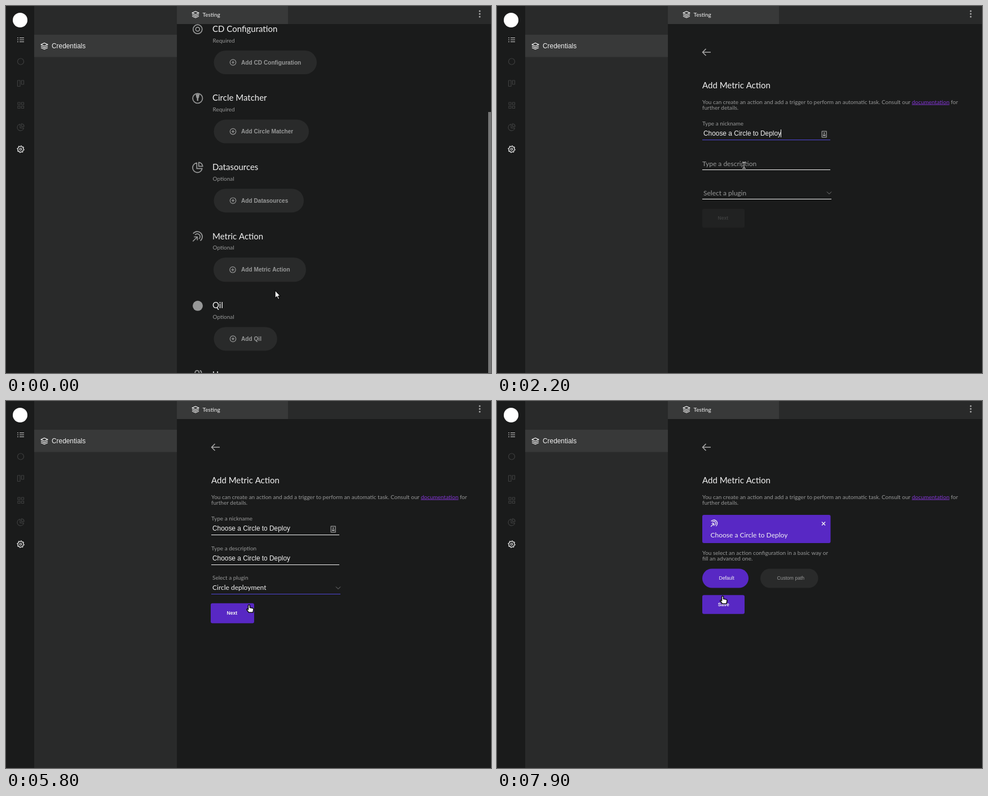
Recreate the animation shown at these times as an HTML page with a canvas. Size 860 px wide and 651 px high, loop 8 s.

```html
<!DOCTYPE html>
<html lang="en">
<head>
<meta charset="utf-8">
<style>
  html, body { margin: 0; width: 100%; height: 100%; overflow: hidden; background: #1a1b1b; }
  canvas { display: block; width: 860px; height: 651px; }
</style>
</head>
<body>
<canvas id="stage" width="860" height="651"></canvas>
<script>
const ctx = document.getElementById('stage').getContext('2d');
const LOOP = 8000, STEP = 100;
const BG = '#1a1b1b', PANEL = '#292a2a', RAISED = '#383939';
const WHITE = '#f2f2f2', GREY = '#979898', DIM = '#3d3e3e';
const PURPLE = '#5828c4', FOCUS = '#4f46d6', LINK = '#8034d0';
const LATO = 'Lato, sans-serif', SANS = '"Liberation Sans", Arial, sans-serif';
const SMALL = 10, BODY = 12, TITLE = 15, INPUT = 11.88, LABEL = 10.15, TINY = 8.57;
const PHRASE = 'Choose a Circle to Deploy';

const clamp = v => Math.max(0, Math.min(1, v));
const mix = (a, b, k) => a + (b - a) * k;

function text(str, x, y, size, color, family = LATO, weight = 400) {
  ctx.font = `${weight} ${size}px ${family}`;
  ctx.fillStyle = color;
  ctx.fillText(str, x, y);
  return x + ctx.measureText(str).width;
}

function box(x, y, w, h, color, r = 0) {
  ctx.fillStyle = color;
  ctx.beginPath();
  ctx.roundRect(x, y, w, h, r);
  ctx.fill();
}

function shape(d, x, y, { stroke, fill, width = 1.4, scale = 1 }) {
  const path = new Path2D(d);
  ctx.save();
  ctx.translate(x, y);
  ctx.scale(scale, scale);
  ctx.lineWidth = width / scale;
  ctx.lineJoin = 'round';
  if (fill) { ctx.fillStyle = fill; ctx.fill(path); }
  if (stroke) { ctx.strokeStyle = stroke; ctx.stroke(path); }
  ctx.restore();
}

const ring = r => `M${r} 0A${r} ${r} 0 1 1 ${-r} 0A${r} ${r} 0 1 1 ${r} 0Z`;
const gear = 'M' + Array.from({ length: 32 }, (_, i) => {
  const a = (i + .5) * Math.PI / 16, r = i % 4 < 2 ? 6 : 4.6;
  return `${r * Math.cos(a)} ${r * Math.sin(a)}`;
}).join('L') + 'Z';

const ICON = {
  layers: 'M0-5.5L6-2.6L0 .3L-6-2.6ZM-6 .3L0 3.1L6 .3M-6 3L0 5.8L6 3',
  target: ring(8) + ring(3.5),
  matcher: ring(8.7) + 'M0 4V-1',
  keyhole: 'M-3.5-7.5H3.5L2.5-2.5Q2 0 1.2 0V4.5H-1.2V0Q-2 0-2.5-2.5Z',
  pie: 'M-1.5-8A8.5 8.5 0 1 0 8 2H-1.5ZM2-9A7.5 7.5 0 0 1 9-2H2Z',
  metric: 'M-7.9-5.2A9 9 0 1 1 4.7 7.4M-4.6-2.9A5 5 0 1 1 2.4 4.1M-8.5 8.5L-.5 .5M-6.5 .5H-.5V6.5',
  users: 'M-7 8V4Q-7 1-3 1H1Q5 1 5 4V8M2.5-4A3.5 3.5 0 1 1-4.5-4A3.5 3.5 0 1 1 2.5-4M4-7.5A3.6 3.6 0 0 1 4-.5',
  add: ring(5.2) + 'M-2.6 0H2.6M0-2.6V2.6',
  list: 'M-6-3.5H-4M-6 0H-4M-6 3.5H-4M-2-3.5H6M-2 0H6M-2 3.5H6',
  board: 'M-5.5-5H-1V5.5H-5.5ZM1.5-5H5.5V2H1.5Z',
  grid: 'M-5-5H-1V-1H-5ZM1.5-5H5.5V-1H1.5ZM-5 1.5H-1V5.5H-5ZM1.5 1.5H5.5V5.5H1.5Z',
  back: 'M15 0H.8M6.5-6L.5 0L6.5 6',
  chevron: 'M-4-2L0 2L4-2',
  close: 'M-3-3L3 3M3-3L-3 3'
};

const CURSOR = {
  arrow: 'M0 0V14.5L3.3 11.5L5.5 16.6L8 15.5L5.8 10.6H10Z',
  beam: 'M-3-5.5H-1L0-5L1-5.5H3M0-5V5M-3 5.5H-1L0 5L1 5.5H3',
  hand: 'M-1.5 1Q0-1 1.5 1V5L6.5 6Q8 6.5 8 8L7 13.5H-.5L-4 9Q-4.5 7-2.5 7.5L-1.5 8.5Z'
};

// time, x, y, kind
const POINTER = [
  [0, 477, 504, 'arrow'], [200, 477, 504, 'arrow'], [400, 461, 472, 'hand'], [500, 457, 463, 'hand'],
  [700, 457, 463, 'arrow'], [1000, 457, 463, 'arrow'], [1100, 454, 300, 'arrow'], [1300, 450, 227, 'beam'],
  [1800, 450, 227, 'beam'], [2000, 450, 279, 'beam'], [2200, 438, 282, 'beam'], [4000, 438, 282, 'beam'],
  [4100, 440, 303, 'arrow'], [4200, 440, 303, 'arrow'], [4300, 434, 326, 'arrow'], [4600, 434, 326, 'arrow'],
  [4700, 434, 368, 'arrow'], [4800, 434, 368, 'arrow'], [5000, 432, 355, 'arrow'], [5200, 431.5, 354, 'arrow'],
  [5300, 431.5, 354, 'arrow'], [5400, 431, 361.5, 'hand'], [6600, 431, 361.5, 'hand'], [6700, 441, 290, 'arrow'],
  [6800, 448, 205, 'arrow'], [6900, 455, 187, 'arrow'], [7000, 455, 187, 'arrow'], [7100, 473, 203, 'arrow'],
  [7200, 473, 203, 'arrow'], [7600, 402, 340, 'arrow'], [7700, 400, 346, 'hand'], [8000, 400, 346, 'hand']
];

function drawPointer(t) {
  const i = POINTER.findLastIndex(p => p[0] <= t);
  const a = POINTER[i], b = POINTER[i + 1] || a;
  const k = a === b ? 0 : (t - a[0]) / (b[0] - a[0]);
  const x = mix(a[1], b[1], k), y = mix(a[2], b[2], k), kind = a[3];
  if (kind === 'beam') {
    shape(CURSOR.beam, x, y + .5, { stroke: '#111', width: 2.2 });
    shape(CURSOR.beam, x, y + .5, { stroke: '#fff', width: 1 });
  } else {
    shape(CURSOR[kind], x, y, { stroke: '#111', fill: '#fff', width: 1.6 });
  }
}

function drawFrame() {
  box(50, 0, 253, 651, PANEL);
  box(50, 51, 253, 39.5, RAISED);
  box(303, 0, 557, 32, PANEL);
  box(303, 0, 197, 32, RAISED);
  shape(ring(13), 25, 25, { fill: '#fff' });
  shape(ICON.list, 26, 60, { stroke: '#d0d0d0', width: 1.1 });
  shape(ring(5.5), 26, 98.5, { stroke: DIM, width: 1.2 });
  shape(ICON.board, 26, 137, { stroke: DIM, width: 1.2 });
  shape(ICON.grid, 26, 176, { stroke: DIM, width: 1.2 });
  shape(ICON.pie, 26, 215, { stroke: DIM, width: 1.2, scale: .68 });
  shape(gear, 26, 254, { stroke: WHITE, width: 1.2 });
  shape(ring(1.8), 26, 254, { stroke: WHITE, width: 1.1 });
  shape(ICON.layers, 68, 71, { stroke: WHITE, width: 1.2 });
  text('Credentials', 81, 75, INPUT, WHITE, SANS);
  shape(ICON.layers, 336, 15, { stroke: WHITE, width: 1.2 });
  text('Testing', 348.5, 18.7, SMALL, WHITE);
  for (const y of [9, 14, 19]) shape(ring(1.5), 840, y, { fill: '#a8a8a8' });
}

const SECTIONS = [
  ['CD Configuration', 'Required', 'target'], ['Circle Matcher', 'Required', 'matcher'],
  ['Datasources', 'Optional', 'pie'], ['Metric Action', 'Optional', 'metric'],
  ['Qil', 'Optional', ''], ['Users', 'Optional', 'users']
];

function drawSections(t) {
  SECTIONS.forEach(([name, note, icon], i) => {
    const y = 40.5 + i * 122.6;
    if (icon) shape(ICON[icon], 339.8, y + .7, { stroke: GREY, width: 1.7 });
    else shape(ring(9), 340, y + .9, { fill: GREY });
    if (icon === 'matcher') shape(ICON.keyhole, 339.8, y + .7, { fill: GREY });
    text(name, 366, y + 5.3, TITLE, WHITE);
    text(note, 366.5, y + 24, SMALL, GREY);
    const label = 'Add ' + name;
    ctx.font = `700 ${LABEL}px ${SANS}`;
    const w = ctx.measureText(label).width + 76.3;
    const grow = i === 3 && (t < 100 || t >= 400) ? .5 : 0;
    box(368.5 - grow, y + 38.5 - grow, w + 2 * grow, 42 + 2 * grow, PANEL, 21);
    shape(ICON.add, 402.5 - grow, y + 59.5, { stroke: GREY, width: 1.2 });
    text(label, 417, y + 63, LABEL, GREY, SANS, 700);
  });
  box(855, 188, 5, 463, '#757676');
}

function caret(x, y, t, since) {
  if (Math.floor((t - since) / 600) % 2 === 0) box(x, y, 1, 14, WHITE);
}

function field(t, { label, y, x = 364, width = 227, focus, blur, filled, value, family = SANS }) {
  const k = clamp((t - focus + STEP) / 200), active = t >= focus && t < blur;
  text(label, x, y - mix(6.5, 25, k), mix(BODY, SMALL, k), GREY);
  box(364, y, width, 1, active ? FOCUS : WHITE);
  const typed = t >= filled, size = family === SANS ? INPUT : BODY;
  const end = typed ? text(value, 366, y - 7.3, size, WHITE, family) : 366;
  if (active && (family === SANS || !typed)) caret(Math.floor(end), y - 18, t, typed ? filled : focus);
}

function button(label, x, y, { on = true, hover = false }) {
  const g = hover ? 1 : 0;
  box(364 - g, y - g, 75 + 2 * g, 33.6 + 2 * g, on ? PURPLE : '#212222', 3);
  text(label, x, y + 19.5, TINY, on ? WHITE : DIM, SANS, 700);
}

function drawHeader(t) {
  const slide = clamp((1200 - t) / 300);
  ctx.save();
  ctx.globalAlpha = Math.max(ctx.globalAlpha, .75);
  shape(ICON.back, 364 + 10 * slide, 82, { stroke: '#a9a9a9', width: 1.6 });
  ctx.restore();
  text('Add Metric Action', 364, 146.3, TITLE, WHITE);
  const intro = 'You can create an action and add a trigger to perform an automatic task. Consult our ';
  const start = text(intro, 364, 173.5, SMALL, GREY);
  const end = text('documentation', start, 173.5, SMALL, LINK);
  box(start, 174.5, end - start, 1, LINK);
  text(' for', end, 173.5, SMALL, GREY);
  text('further details.', 364, 183.7, SMALL, GREY);
}

function drawForm(t) {
  field(t, { label: 'Type a nickname', y: 237, focus: 1400, blur: 2500, filled: 2000, value: PHRASE });
  if (t >= 1400) {
    box(575.5, 221.5, 9.5, 12, '#858686', 1);
    box(577, 223, 6.5, 9, BG);
    shape(ring(1.3), 580.2, 225.6, { fill: '#a0a0a0' });
    box(578, 228, 4.5, 2.5, '#a0a0a0');
  }
  field(t, { label: 'Type a description', y: 290, focus: 2500, blur: 4300, filled: 3800, value: PHRASE });
  field(t, { label: 'Select a plugin', y: 342, x: 366, width: 229, focus: 4300, blur: LOOP, filled: 5400,
    value: 'Circle deployment', family: LATO });
  shape(ICON.chevron, 589, 331.5, { stroke: '#7c7d7d', width: 1 });
  if (t < 1200) {
    for (let i = 0; i < 3; i++) {
      ctx.save();
      ctx.globalAlpha = [.6, .1, .75][(i + (t - 900) / STEP + 9) % 3];
      shape(ring(1.6), 567.5 + 6.8 * i, 337.5, { fill: GREY });
      ctx.restore();
    }
  }
  button('Next', 391.5, 359.7, { on: t >= 5400, hover: t >= 5500 });
  if (t >= 4400 && t < 5400) {
    box(364, 344, 229, 33, PANEL, 2);
    text('Circle deployment', 374, 364.5, BODY, WHITE);
  }
}

function drawSetup(t) {
  box(364, 202, 227.5, 50, PURPLE, 3);
  shape(ICON.metric, 385, 217, { stroke: WHITE, width: 1.3, scale: .68 });
  shape(ICON.close, 579, 217.5, { stroke: WHITE, width: 1.4 });
  text(PHRASE, 378.5, 242, BODY, WHITE);
  text('You select an action configuration in a basic way or', 364, 273.2, SMALL, GREY);
  text('fill an advanced one.', 364, 283.4, SMALL, GREY);
  box(364, 297.5, 82, 34, PURPLE, 17);
  text('Default', 393.5, 317, TINY, WHITE, SANS);
  box(467, 297.5, 102.5, 34, PANEL, 17);
  text('Custom path', 496.5, 317, TINY, GREY, SANS);
  button('Save', 391.7, 344.2, { hover: t < 6900 || (t >= 7700 && t < 7900) });
}

function draw(t) {
  box(0, 0, 860, 651, BG);
  if (t < 700) {
    drawSections(t);
  } else {
    ctx.globalAlpha = t < 900 ? (t - 700) / 800 : clamp(.22 + (t - 900) / 385);
    drawHeader(t);
    if (t < 6100) {
      drawForm(t);
    } else {
      ctx.globalAlpha = clamp((t - 6000) / 300);
      drawSetup(t);
    }
    ctx.globalAlpha = 1;
  }
  drawFrame();
  drawPointer(t);
}

function tick() {
  draw(Math.floor(performance.now() % LOOP / STEP) * STEP);
  requestAnimationFrame(tick);
}
tick();
</script>
</body>
</html>
```
